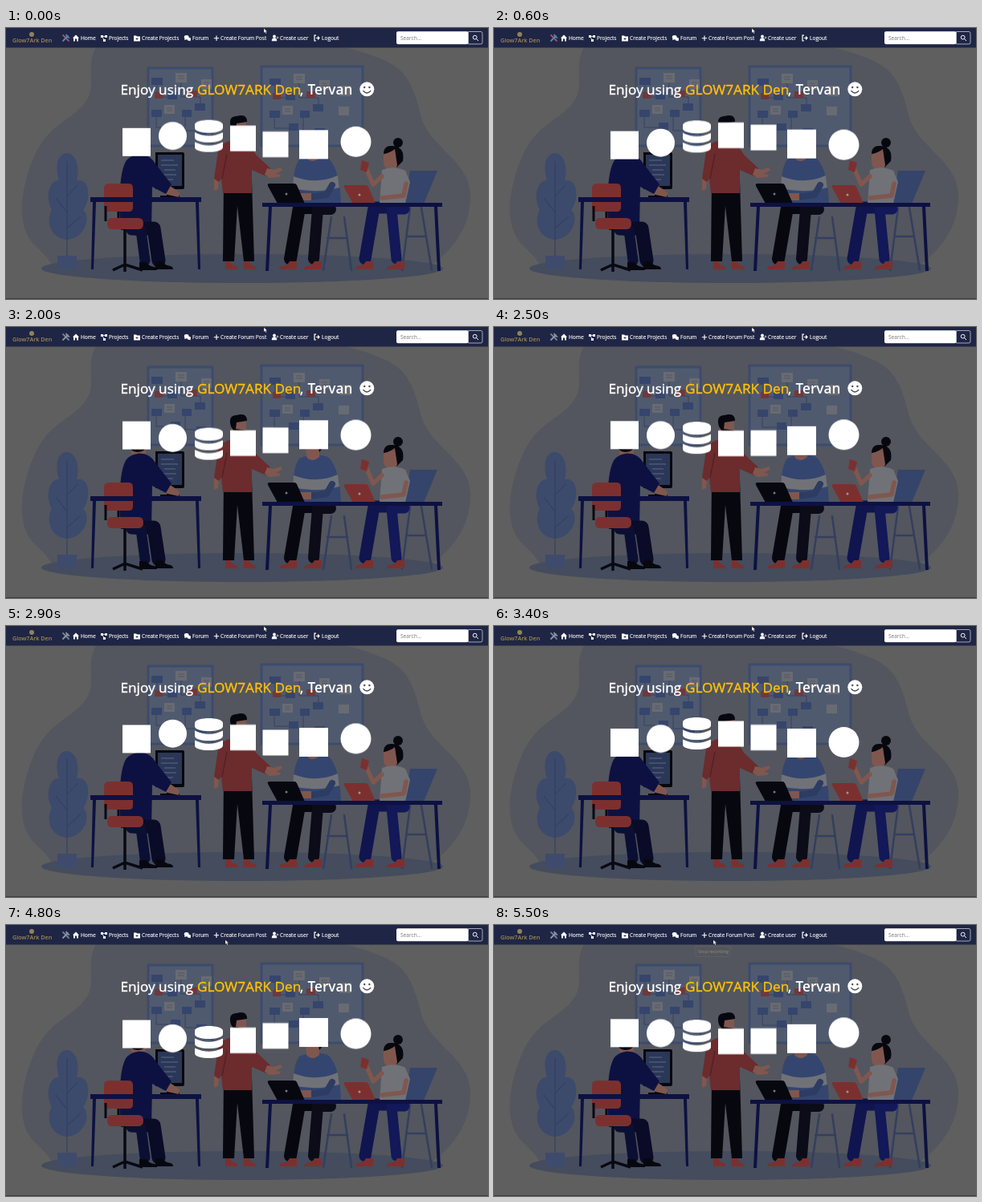
Recreate the animation shown at these times as an HTML page. Size 600 by 338 pixels, loop 5600 ms.

```html
<!DOCTYPE html>
<html lang="en">
<head>
<meta charset="utf-8">
<title>Welcome page</title>
<style>
  html, body { margin: 0; width: 100%; height: 100%; overflow: hidden; background: #5f5f5f; }
  svg { display: block; width: 100vw; height: 100vh; }
  text { font-family: "Open Sans", "Noto Sans", sans-serif; fill: #fff; }
  .nav { font-size: 6.6px; stroke: #fff; stroke-width: .15px; }
  .head { font-size: 17.2px; color: #fff; }
  .head text { fill: currentColor; stroke: currentColor; stroke-width: .4px; }
  .head .name { font-weight: 600; stroke: none; }
  .line { fill: none; stroke: #fff; }
  .navy { fill: #0d1142; }
  .black { fill: #07080f; }
  .red { fill: #7b302f; }
  .shirt { fill: #6c2b2d; }
  .skin { fill: #80574e; }
  .pale { fill: #707278; }
  .limb { fill: none; stroke-linecap: round; stroke-linejoin: round; }
  .bob {
    animation: bob 3s ease infinite paused;
    animation-delay: calc(var(--i) * 500ms - 3567ms - var(--t, 0) * 1ms);
  }
  @keyframes bob {
    0%, 100% { transform: translateY(-6px); }
    50% { transform: translateY(6px); }
  }
</style>
</head>
<body>
<svg id="stage" viewBox="0 0 600 338" preserveAspectRatio="none">
  <defs>
    <g id="notes">
      <path d="M15 20v16h20M45 16v20h24v14M14 60v14h24M50 56v22h22" fill="none" stroke="#303c5a" stroke-width=".8"/>
      <path fill="#35456c" d="M8 12h14v9H8zM28 30h12v9H28zM62 44h13v9H62zM8 52h13v9H8zM32 68h12v9H32zM64 74h13v9H64zM46 52h12v9H46z"/>
      <path fill="#686b72" d="M38 6h14v12H38zM70 14h13v12H70zM24 46h13v11H24z"/>
      <path fill="#70383b" d="M12 30h10v8H12zM54 28h11v8H54z"/>
      <path d="M41 10h8M41 13h8M73 18h7M73 21h7M27 50h7M27 53h7" stroke="#485066" stroke-width=".7"/>
    </g>
    <path id="shoe" d="M0 0h9q2 5 10 6q3 1 3 4H0z"/>
  </defs>

  <rect width="600" height="338" fill="#5f5f5f"/>
  <path fill="#53565e" d="M112 24C98 50 114 72 99 92C82 116 54 118 35 160C17 203 13 245 33 268C48 283 56 290 60 302H520C550 284 580 252 578 205C574 165 531 150 518 115C508 80 505 55 470 40Q445 29 420 24Z"/>
  <ellipse cx="294" cy="300" rx="250" ry="18" fill="#444c5d"/>

  <rect x="177" y="50" width="80" height="97" fill="#505a6e" stroke="#3d4b6c" stroke-width="3"/>
  <use href="#notes" x="173" y="50"/>
  <rect x="318" y="48" width="126" height="99" fill="#505a6e" stroke="#3d4b6c" stroke-width="3"/>
  <use href="#notes" x="320" y="51"/>
  <path fill="#686b72" d="M415 72h15v13h-15zM414 98h13v11h-13z"/>

  <!-- plant -->
  <path fill="#3c4a6c" d="M76 156C88 157 92 175 88 190C106 187 105 216 96 227C107 237 97 262 77 264C55 263 49 241 57 227C48 211 54 189 66 190C60 171 65 156 76 156Z"/>
  <path d="M76 166V285M76 210L89 196M76 230L62 212M76 250L93 235" fill="none" stroke="#303c5c"/>
  <path fill="#3e4b6c" d="M64 284h24v17H64z"/>

  <!-- left workstation -->
  <path class="black" d="M186 155h34q2 0 2 2v42q0 2-2 2h-34zM200 201h8v8h8v3h-24v-3h8z"/>
  <path fill="#2b3756" d="M189 158h30v39h-30z"/>
  <path d="M193 165h16M193 171h21M197 177h14M193 183h19M197 189h11" stroke="#5e6988"/>
  <path class="skin" d="M156 143h18v15q-9 8-18 0zM203 196l13 9-1 6-18-4z"/>
  <path class="navy" d="M150 165C160 155 177 155 185 168L206 195L199 207L182 198L181 252H143C141 220 140 180 150 165Z"/>
  <ellipse class="black" cx="164" cy="145" rx="12" ry="11"/>
  <path class="limb" d="M160 250H184L190 290" stroke="#090b27" stroke-width="17"/>
  <path class="limb" d="M156 252H168L173 290" stroke="#0c0f34" stroke-width="13"/>
  <use href="#shoe" class="black" x="166" y="292"/>
  <use href="#shoe" class="black" x="186" y="291"/>
  <path d="M148 250V297M133 302L148 295L170 302M148 295V304" fill="none" stroke="#080912" stroke-width="3.5"/>
  <path class="red" d="M128 194h25q5 0 5 6v24q0 5-5 5h-25q-6 0-6-5v-24q0-6 6-6zM131 237h34q6 0 6 7t-6 7h-34q-5 0-5-7t5-7z"/>
  <path d="M140 229v8M124 222v19" fill="none" stroke="#080912" stroke-width="3"/>
  <path class="navy" d="M105 211h138v6H105zM108 217h4l-3 84h-3zM236 217h4l2 84h-3z"/>

  <!-- standing presenter -->
  <path class="black" d="M271 190H306L309 291H296L288 222L284 291H270Z"/>
  <use href="#shoe" class="red" transform="translate(273 291) scale(.7 1)"/>
  <use href="#shoe" class="red" transform="translate(296 291) scale(.7 1)"/>
  <path class="shirt" d="M275 142Q290 136 302 143L311 158L329 175L324 185L306 177V206H270L268 188L264 193L259 188L264 154Q267 145 275 142Z"/>
  <path d="M275 157l-6 31" fill="none" stroke="#4c2026" stroke-width="1.2"/>
  <path class="skin" d="M284 115h15v15q-2 8-9 8v5h-9v-21zM325 175l8 2 9-3 2 3-8 5 6 1-2 3-12 1-6-4zM259 188l6 4-1 9-5 2z"/>
  <path class="black" d="M280 124Q276 110 287 110Q300 106 300 117L287 119L286 127L299 129Q297 139 288 137Z"/>

  <!-- seated colleague -->
  <path d="M405 236L395 302M421 236L430 302M400 262H425" class="limb" stroke="#343f5e" stroke-width="2.5"/>
  <path class="limb" d="M400 224H365L354 288" stroke="#07080f" stroke-width="16"/>
  <path class="limb" d="M404 226H388L383 288" stroke="#0b0c17" stroke-width="14"/>
  <use href="#shoe" class="red" transform="translate(362 291) scale(-1 1)"/>
  <use href="#shoe" class="red" transform="translate(393 291) scale(-1 1)"/>
  <path fill="#34466f" d="M365 164Q384 155 402 163Q416 178 417 220H358Q355 178 365 164Z"/>
  <path class="pale" d="M358 185Q386 196 413 184L415 199Q386 207 357 200Z"/>
  <path d="M406 196L399 208L378 211" class="limb" stroke="#2c3c63" stroke-width="8"/>
  <path class="skin" d="M373 142h17v20q-9 8-16 0zM366 206h14v9h-14z"/>
  <path class="black" d="M370 144Q370 132 382 134Q395 132 395 150L390 156L388 145Z"/>

  <!-- seated colleague with a cup -->
  <path fill="#35446a" d="M503 178H537L520 219H496Z"/>
  <path d="M503 224L493 302M517 224L530 302M499 260H522" class="limb" stroke="#343f5e" stroke-width="2.5"/>
  <path class="limb" d="M493 224H458L447 288" stroke="#10154f" stroke-width="15"/>
  <path class="limb" d="M496 226H480L486 288" stroke="#121858" stroke-width="13"/>
  <use href="#shoe" class="red" transform="translate(457 291) scale(-1 1)"/>
  <use href="#shoe" class="red" transform="translate(496 291) scale(-1 1)"/>
  <circle class="black" cx="488" cy="143" r="6"/>
  <path class="black" d="M470 160Q469 146 481 147Q497 148 494 166L486 174H475Z"/>
  <path class="skin" d="M471 157q8-2 13-6l3 20-4 11h-10v-8q-4-1-3-17z"/>
  <path class="pale" d="M468 177Q483 171 497 178L503 192L497 219H465Z"/>
  <path class="limb" d="M468 185L457 195L449 177" stroke="#80574e" stroke-width="5.5"/>
  <path class="limb" d="M498 194L495 209L468 212" stroke="#80574e" stroke-width="5.5"/>
  <path class="red" d="M443 165l9 3-3 12-8-3z"/>

  <path class="black" d="M328 194h31q2 0 3 2l10 23h-34l-12-22q-1-3 2-3z"/>
  <path class="red" d="M422 196h26q2 0 3 2l9 21h-28l-11-20q-1-3 1-3z"/>
  <circle cx="349" cy="207" r="1.5" fill="#777"/>
  <circle cx="440" cy="208" r="1.5" fill="#999"/>
  <path class="navy" d="M319 218h224v5H319zM327 223h4l-4 80h-4zM533 223h4l4 80h-4z"/>
  <path d="M0 337.5H600" stroke="#3c3c3c"/>

  <!-- navigation -->
  <rect width="600" height="24.5" fill="#1f2544"/>
  <circle cx="32" cy="8" r="3" fill="#8f8259"/>
  <text x="8" y="18" style="font-size:7.2px;font-weight:600;fill:#a38d4c">Glow7Ark Den</text>
  <g fill="none" stroke-width="1.8" stroke-linecap="round">
    <path id="driver" d="M71 9L78 16"/>
    <path id="wrench" d="M71 16L77 10M75 8.5L76 11L78.5 12"/>
  </g>
  <g fill="#fff">
    <path d="M83 12.5L87 8.5L91 12.5H90V16.5H88V13.5H86V16.5H84V12.5Z"/>
    <path d="M118 9h3v3h-3zM123 9h3v3h-3zM121 14h3v3h-3z"/>
    <path d="M120 10.5H125M120 11L122 15" stroke="#fff" stroke-width=".8"/>
    <path d="M159 9.5h3l1 1h4v6h-8z"/>
    <path d="M163 12v3M161.5 13.5h3" stroke="#1f2544" stroke-width=".8"/>
    <ellipse cx="224.7" cy="11.5" rx="2.9" ry="2.4"/>
    <ellipse cx="227.7" cy="13.8" rx="2.4" ry="2.1"/>
    <path d="M222 15l1-3 3 2zM230 16.6l-3-1.6 2-1z"/>
    <path d="M262 9.5V16M258.8 12.7h6.4" stroke="#fff" stroke-width="1.1"/>
    <circle cx="334" cy="10.5" r="1.9"/>
    <path d="M331 16q0-3.5 3-3.5t3 3.5zM338 10.5v3M336.5 12h3" stroke="#fff" stroke-width=".6"/>
    <path d="M386 9.2H384V16H386M386 12.5H390M388 10.5L390 12.5L388 14.5" class="line" stroke-width="1.2"/>
  </g>
  <g class="nav" id="links"></g>
  <rect x="486" y="4.3" width="89.5" height="16" rx="2" fill="#fff"/>
  <text x="491" y="14.8" style="font-size:6.6px;fill:#777">Search...</text>
  <path d="M575.5 4.5H591Q593 4.5 593 6.5V18Q593 20 591 20H575.5Z" fill="#1f2544" stroke="#dfe1e7" stroke-width=".7"/>
  <circle class="line" cx="583.7" cy="11.7" r="2.4"/>
  <path class="line" d="M585.5 13.5L588 16"/>

  <!-- greeting -->
  <g class="head">
    <text x="142.5" y="83">Enjoy using</text>
    <text x="238" y="83" color="#ffc107">GLOW7ARK Den</text>
    <text x="366" y="83">,</text>
    <text x="375.5" y="83" class="name">Tervan</text>
  </g>
  <circle cx="449.3" cy="76.3" r="9" fill="#fff"/>
  <g fill="#484c57">
    <circle cx="446.2" cy="74" r="1.2"/>
    <circle cx="452.4" cy="74" r="1.2"/>
  </g>
  <path d="M444.8 78.5Q449.3 83.5 453.8 78.5" fill="none" stroke="#484c57" stroke-width="1.3" stroke-linecap="round"/>

  <g fill="#fff">
    <g class="bob" style="--i:0"><rect x="145" y="123" width="35" height="35"/></g>
    <g class="bob" style="--i:1"><circle cx="207.5" cy="140.2" r="17.5"/></g>
    <g class="bob" style="--i:2">
      <path d="M235 126C235 118 270 118 270 126V130C270 138 235 138 235 130ZM235 135.5Q252.5 144 270 135.5V142C270 150 235 150 235 142ZM235 147.5Q252.5 156 270 147.5V154C270 162 235 162 235 154Z"/>
    </g>
    <g class="bob" style="--i:3"><rect x="279" y="123.5" width="32" height="32"/></g>
    <g class="bob" style="--i:4"><rect x="319.5" y="123.5" width="32" height="32"/></g>
    <g class="bob" style="--i:5"><rect x="365" y="122" width="36" height="36"/></g>
    <g class="bob" style="--i:6"><circle cx="435.5" cy="140" r="19"/></g>
  </g>

  <g id="tip">
    <rect x="251" y="26.5" width="43" height="13" fill="#55565a" stroke="#66676b" stroke-width=".6"/>
    <text x="254" y="35" style="font-size:5.6px;fill:#8b8c92">Stop recording</text>
  </g>
  <path id="cursor" d="M0 0V5.5L1.4 4.4L2.4 6.5L3.4 6L2.4 4H4.2Z" fill="#fff" stroke="#222" stroke-width=".3"/>
</svg>
<script>
  const LOOP = 5600, STEP = 100;
  const byId = id => document.getElementById(id);
  const clamp = v => Math.min(1, Math.max(0, v));

  const links = [["Home", 93], ["Projects", 128], ["Create Projects", 169], ["Forum", 232],
    ["Create Forum Post", 267], ["Create user", 341], ["Logout", 393]];
  byId("links").innerHTML = links.map(([label, x]) => `<text x="${x}" y="15">${label}</text>`).join("");

  function draw(t) {
    byId("stage").style.setProperty("--t", t);
    const u = clamp((t - 4100) / 600), k = u * u * (3 - 2 * u);
    byId("cursor").setAttribute("transform", `translate(${321 - 48 * k} ${0.5 + 18 * k})`);
    byId("tip").setAttribute("opacity", clamp((t - 5300) / 200));
    const vivid = t < 900;
    byId("driver").setAttribute("stroke", vivid ? "#a6535c" : "#777f96");
    byId("wrench").setAttribute("stroke", vivid ? "#5486bd" : "#8d94a6");
  }

  function tick(now) {
    draw(Math.floor(now % LOOP / STEP) * STEP);
    requestAnimationFrame(tick);
  }
  draw(0);
  requestAnimationFrame(tick);
</script>
</body>
</html>
```
